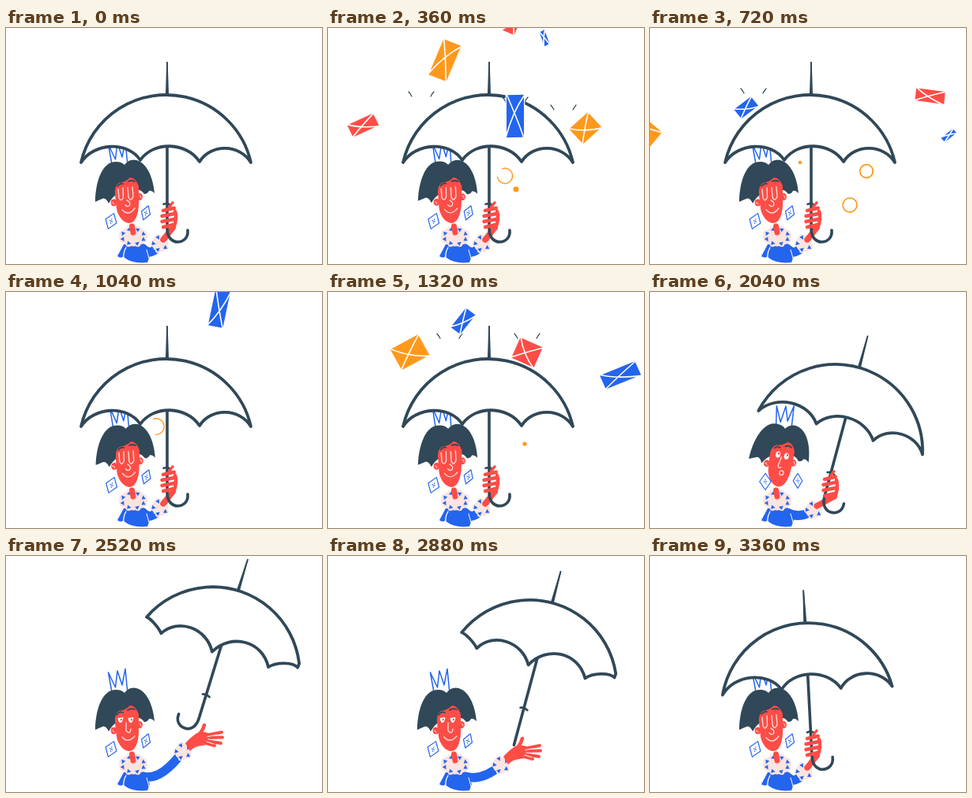
Animation of 400 by 300 pixels, one loop 3.4 s. Source, as an HTML page with a canvas:

```html
<!DOCTYPE html>
<html lang="en">
<head>
<meta charset="utf-8">
<title>Umbrella in the mail rain</title>
<style>
  html, body { margin: 0; width: 100%; height: 100%; overflow: hidden; background: #fff; }
  canvas { display: block; width: 400px; height: 300px; }
</style>
</head>
<body>
<canvas id="stage"></canvas>
<script>
const LOOP = 3400, STEP = 40;
const INK = '#304858', BLUE = '#2465ee', RED = '#fe4d47', PINK = '#fce4e1', ORANGE = '#ff991c';
const WHITE = '#fff', BLUSH = '#ffd9d2';

const canvas = document.getElementById('stage');
const ctx = canvas.getContext('2d');
const ratio = window.devicePixelRatio || 1;
canvas.width = 400 * ratio;
canvas.height = 300 * ratio;

const rad = d => d * Math.PI / 180;
const lerp = (a, b, k) => a + (b - a) * k;
const progress = (t, from, to) => Math.min(1, Math.max(0, (t - from) / (to - from)));
const ease = (t, from, to) => {
  const k = progress(t, from, to);
  return k * k * (3 - 2 * k);
};

const fill = (d, color) => { ctx.fillStyle = color; ctx.fill(new Path2D(d)); };
function line(d, color, width) {
  ctx.strokeStyle = color;
  ctx.lineWidth = width;
  ctx.stroke(new Path2D(d));
}
function oval(x, y, rx, ry, color) {
  ctx.fillStyle = color;
  ctx.beginPath();
  ctx.ellipse(x, y, rx, ry, 0, 0, 7);
  ctx.fill();
}
function group(x, y, deg, draw) {
  ctx.save();
  ctx.translate(x, y);
  ctx.rotate(rad(deg));
  draw();
  ctx.restore();
}

// color, length, width, then the bounce: time, x, y, angle
const MAIL = [
  [RED, 37, 18, 210, 118, 105, 7],
  [ORANGE, 33, 27, 302, 298, 122, -52],
  [BLUE, 55, 23, 360, 237, 112, 91],
  [ORANGE, 50, 25, 420, 148, 86, 102],
  [RED, 38, 17, 480, 236, 79, -39],
  [BLUE, 20, 8, 483, 274, 105, 97],
  [BLUE, 28, 16, 700, 131, 101, -31],
  [BLUE, 49, 20, 1130, 270, 88, -59],
  [ORANGE, 41, 31, 1220, 154, 77, -7],
  [RED, 32, 29, 1320, 252, 77, 26],
  [BLUE, 32, 16, 1400, 171, 97, -66]
];

// Falls straight, then flies off sideways: bigger ones faster, those near the top higher.
function drawEnvelope(t, [color, w, h, at, x, y, angle]) {
  const age = t - at, side = x < 204 ? -1 : 1;
  if (age > 700) return;
  if (age < 0) y += 0.75 * age;
  else {
    const slope = Math.abs(x - 204) / 110;
    if (age < 160) {
      for (const dx of [-12, 12]) {
        line(`M${x + dx} ${y - 18}q${dx / 6} -4 ${dx / 3} -6`, INK, 1.2);
      }
    }
    x += side * (0.38 + 0.003 * w) * age;
    y += lerp(-0.2, 0.1, slope) * age + 0.0006 * age * age;
  }
  group(x, y, angle + 0.2 * side * age, () => {
    const a = w / 2, b = h / 2;
    const shape = `M${-a} ${-b + 1}L${a - 1} ${-b}L${a} ${b - 1}L${-a + 1} ${b}Z`;
    line(shape, WHITE, 2.5);
    fill(shape, color);
    line(`M${-a} ${-b}Q${-a * 0.2} ${b * 0.3} ${a} ${b}M${-a} ${b}Q${a * 0.1} ${-b * 0.2} ${a} ${-b}`, WHITE, 1.6);
  });
}

// start, x, y
const BUBBLES = [
  [20, 224, 188], [265, 238, 205], [480, 274, 182], [430, 253, 225], [660, 190, 171], [1250, 249, 193]
];

// A dot swells into a ring, which then breaks open.
function drawBubble(t, [start, x, y]) {
  const k = (t - start) / 400;
  if (k <= 0 || k >= 1) return;
  if (k < 0.3) return oval(x, y, k * 15, k * 15, ORANGE);
  const gap = Math.max(0, k - 0.75) * 14;
  ctx.strokeStyle = ORANGE;
  ctx.lineWidth = lerp(2.6, 1.3, k);
  ctx.beginPath();
  ctx.arc(x, y, 5 + k * 5.5, -1.9, -1.9 + 2 * Math.PI - gap);
  ctx.stroke();
}

function drawUmbrella(x, y, tilt, turn, spin) {
  group(x, y, tilt, () => {
    const c = turn ? Math.cos(rad(spin)) : 1;
    line(`M0 -120L0 20C0 33 ${8 * c} 37 ${13 * c} 37C${20 * c} 37 ${27 * c} 32 ${26 * c} 22`, INK, 3.6);
    line('M-4.5 -11Q0 -13 5 -10', INK, 2.6);
    fill('M-.7 -192L.7 -192L2.1 -149L-2.1 -149Z', INK);
    line('M0 -191L0 -150', INK, 1.8);

    const edge = lerp(-64, -84, turn), half = lerp(107.5, 101, turn), mid = lerp(-1.5, 0, turn);
    const rise = 150 + edge, r = (half * half + rise * rise) / (2 * rise);
    const open = Math.asin(half / r);

    // Ribs circle the shaft while the umbrella spins.
    let ribs = [[-32.5, -3], [42.5, -1]];
    if (turn) {
      ribs = [];
      const first = ((spin - 5) % 45 + 45) % 45 - 90;
      for (let a = first; a < 88; a += 45) {
        if (a > -88) ribs.push([half * Math.sin(rad(a)), 18 * turn * Math.sqrt(Math.cos(rad(a)))]);
      }
    }
    const rim = [[-half, 0], ...ribs, [half, 0]].reverse();

    ctx.beginPath();
    ctx.arc(mid, -150 + r, r, -Math.PI / 2 - open, -Math.PI / 2 + open);
    for (let i = 1; i < rim.length; i++) {
      const [ax, ay] = rim[i - 1], [bx, by] = rim[i];
      const lift = Math.min(25 + 5 * turn, (ax - bx) ** 2 / 180);
      const at = k => [lerp(ax, bx, k) + mid, lerp(ay, by, k) + edge - lift];
      ctx.bezierCurveTo(...at(0.22), ...at(0.78), bx + mid, by + edge);
    }
    ctx.closePath();
    ctx.fillStyle = WHITE;
    ctx.fill();
    ctx.strokeStyle = INK;
    ctx.lineWidth = 3.8;
    ctx.stroke();
  });
}

// Pale frill with a ring of blue triangles
function drawRuff(x, y, rx, ry, count) {
  oval(x, y, rx, ry, PINK);
  for (let i = 0; i < count; i++) {
    const a = (i + 0.5) / count * 2 * Math.PI;
    const px = x + rx * 0.78 * Math.cos(a), py = y + ry * 0.75 * Math.sin(a);
    oval(x + rx * 0.85 * Math.cos(a), y + ry * 0.85 * Math.sin(a), 3.4, 3.4, PINK);
    group(px, py, i * 50, () => fill('M0 -3L2.6 2L-2.6 2Z', BLUE));
  }
}

function drawBody(cuff, reach) {
  fill('M149 275L141 290Q144 293 148 291L150 292Q160 300 179 298L182 290L176 275Z', BLUE);
  line('M152 279Q148 286 149 293', WHITE, 1.3);
  line(`M173 280Q${lerp(184, 195, reach)} ${lerp(292, 287, reach)} ${cuff[0]} ${cuff[1]}`, BLUE, 11.5);
  line('M178 282L182 296', WHITE, 1);
  drawRuff(161, 265, 18, 12.5, 8);
  line('M159.5 252L161 260', RED, 7);
}

const FACES = {
  calm() {
    line('M142 205L143 216Q146 222 148.5 215L148 203M154 203L155 215Q158 222 161 214L160 202', BLUSH, 1.4);
    line('M153 219Q159 222 156 226Q153 228 151 225M147 231Q155 240 163 229', BLUSH, 1.4);
    line('M141 201Q144 197 148 198M155 195Q159 193 163 195', INK, 1.8);
  },
  peek() {
    for (const x of [148, 159]) {
      oval(x, 208, 3, 4, WHITE);
      oval(x + 0.8, 206.5, 1.2, 1.5, RED);
    }
    line('M153 210L151 222Q153 226 155 223', BLUSH, 1.4);
    line('M154.5 230a2.6 2.8 0 1 0 5.2 0a2.6 2.8 0 1 0 -5.2 0', BLUSH, 1.4);
    line('M142 201Q145 197 149 199M155 196Q159 193 163 196', INK, 1.8);
  },
  happy() {
    for (const x of [145, 158]) {
      fill(`M${x - 3.5} 206L${x + 3.5} 205Q${x + 2.5} 212 ${x} 212Q${x - 2.5} 212 ${x - 3.5} 206Z`, WHITE);
      oval(x + 0.8, 208, 1.1, 1.3, RED);
    }
    line('M152 212L152 222Q157 228 158 220M147 230Q154 239 163 229', BLUSH, 1.4);
    line('M140 202Q143 197 148 199M154 196Q158 193 163 195', INK, 1.8);
  }
};

function drawEarring(x, y, rx, ry, tilt) {
  group(x, y, tilt, () => {
    line(`M${-rx} 0L0 ${-ry}L${rx} 0L0 ${ry}Z`, BLUE, 1.2);
    line('M-2 0L2 0M0 -3L0 -2M0 2L1 3', BLUE, 1);
  });
}

function drawHead(peek, bob, face) {
  group(160 + 4 * peek, 255, 12 * peek + bob, () => {
    ctx.translate(-160, -255);
    group(4 * peek, 0, 0, () => line('M134 173L129.5 148L138.5 167L141 146L147 164L151 143.5L153.5 170', BLUE, 1.5));
    fill('M113 221C113 203 118 177 133 171Q144 168 150 174Q156 166 165 168C177 171 186 187 188 210Q184 206 181 207Q179 211 175 211Q171 206 168 206L138 213Q134 216 130 223Q126 215 122 217Q117 219 113 221Z', INK);
    oval(136.5, 222, 4, 4.5, RED);
    oval(169, 214.5, 4, 4.5, RED);
    fill('M138 212Q137 200 143 197Q151 196 157 190Q164 190 168 201L168 226C167 239 163 248 156 248C149 248 142 240 140 230Z', RED);
    line('M134 222Q136 221 137 224M169 213Q171 213 171 216', BLUSH, 1);
    FACES[face]();
  });
  const sway = bob / 2, tilt = 20 * (1 - peek);
  drawEarring(lerp(133, 146, peek) + sway, lerp(245.5, 241, peek), 7.3, 10.5, tilt);
  drawEarring(lerp(177, 187, peek) + sway, lerp(235, 240, peek), 5.8, 9.5, tilt);
}

function drawFist(x, y) {
  group(x, y, 0, () => {
    line('M7 -13L3 -8', RED, 3.5);
    line('M10 -2Q13 7 8 20', RED, 4.5);
    for (let i = 0; i < 4; i++) {
      const fy = -3 + 7 * i, inset = Math.abs(i - 1.5);
      line(`M${-7 + inset * 1.5} ${fy}L${10 - inset} ${fy - 3}`, RED, 4.8);
    }
  });
}

function drawPalm(x, y) {
  group(x - 245, y - 204.5, 0, () => {
    fill('M222 255Q230 246 237 242Q252 238 255 247Q255 257 243 258Q233 259 228 265Z', RED);
    line('M236 247Q243 242 246 232', RED, 4.5);
    line('M248 245L268 241M250 248L269 247.5M249 252L267 255M245 254L259 258', RED, 4);
    line('M250 246.5L262 244.5M251 250L262 251M249 253L258 256', WHITE, 1);
  });
}

function draw(t) {
  ctx.setTransform(ratio, 0, 0, ratio, 0, 0);
  ctx.lineCap = ctx.lineJoin = 'round';
  ctx.fillStyle = WHITE;
  ctx.fillRect(0, 0, 400, 300);

  const peek = ease(t, 1640, 1960) - ease(t, 2240, 2480);
  const lean = ease(t, 1640, 1960) - ease(t, 2980, 3240);
  const lift = ease(t, 2240, 2480) - ease(t, 2980, 3180);
  const turn = ease(t, 2280, 2400) - ease(t, 3100, 3220);
  const hop = lift * Math.sin((t - 2880) / 240 * Math.PI) ** 2;
  const x = 204 + 22 * lean + 19 * lift + 5 * hop;
  const y = 235 + 6 * lean - 36.5 * lift - 17 * hop;
  const tilt = 15 * lean + 2 * hop - 5 * Math.sin(Math.PI * progress(t, 3200, 3400));
  const spin = (t - 2280) * 0.75;

  const tossed = t >= 2340 && t < 3120;
  const bob = t < 1680 ? 0.75 * (1 - Math.cos(t / 120 * Math.PI)) : 0;
  const face = t < 1760 || t >= 3160 ? 'calm' : t < 2400 ? 'peek' : 'happy';
  const cuff = tossed ? [x - 26, y + 61] : [lerp(195, x - 9, 0.55), lerp(274, y + 39, 0.5)];

  drawBody(cuff, tossed ? 1 : peek * 0.5);
  drawHead(peek, bob, face);
  drawRuff(...cuff, 10.5, 10.5, 5);
  if (!tossed) line(`M${cuff[0] + 4} ${cuff[1] - 5}L${x + 7} ${y + 19}`, RED, 7.5);
  drawUmbrella(x, y, tilt, turn, spin);
  (tossed ? drawPalm : drawFist)(x, y);
  for (const b of BUBBLES) drawBubble(t, b);
  for (const m of MAIL) drawEnvelope(t, m);
}

const start = performance.now();
function tick() {
  const t = Math.max(0, performance.now() - start) % LOOP;
  draw(Math.floor(t / STEP) * STEP);
  requestAnimationFrame(tick);
}
tick();
</script>
</body>
</html>
```
